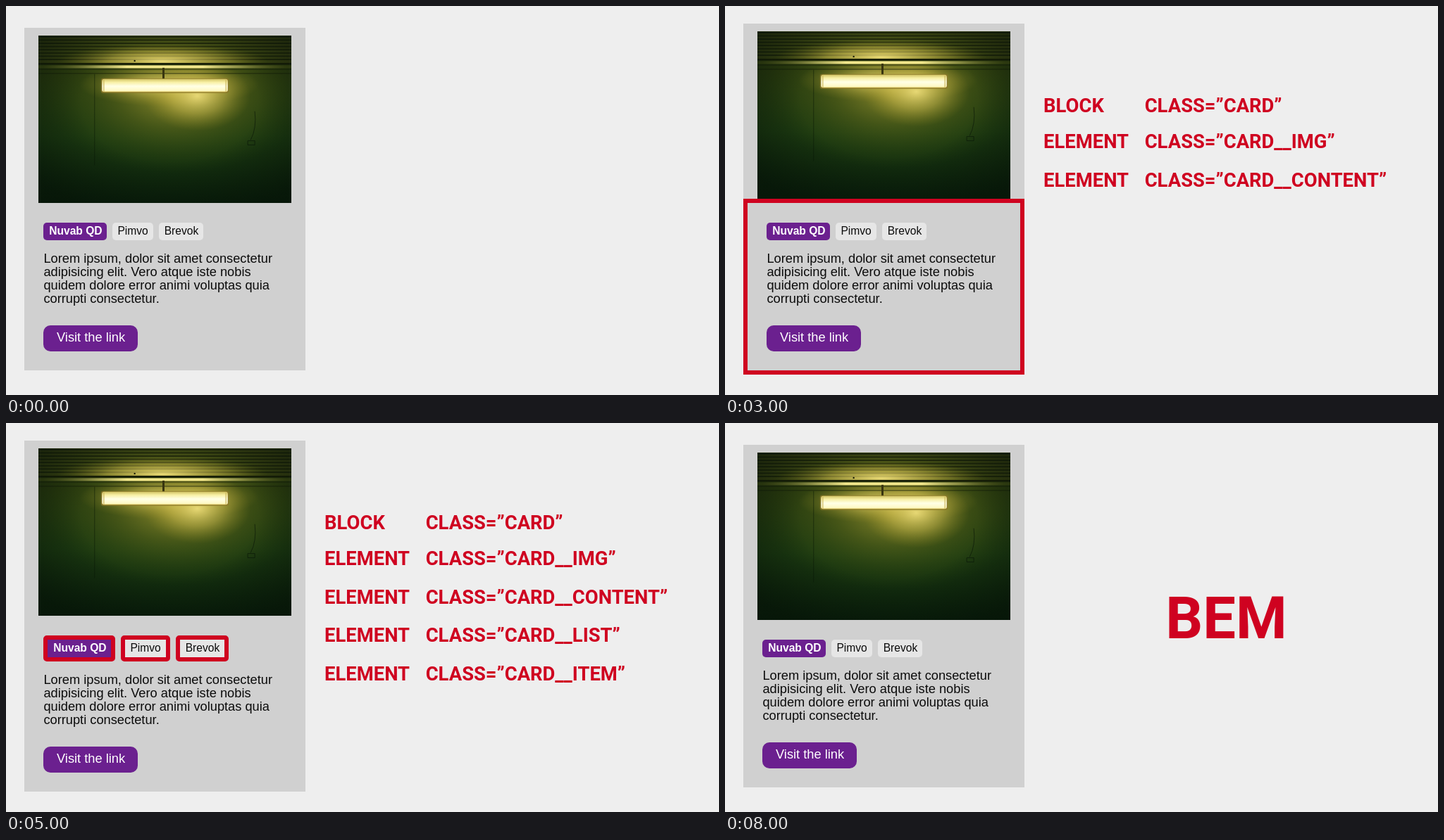
An HTML page for the animation above (9 s loop, 1012 px wide and 553 px high).

```html
<!DOCTYPE html>
<html lang="en">
<head>
<meta charset="utf-8">
<title>BEM card</title>
<style>
  :root { --red: #cf0220; --purple: #6b208f; --row: 54.7px; --loop: 9s; }

  html, body { margin: 0; width: 100%; height: 100%; overflow: hidden; background: #eee; }
  body { position: relative; }

  /* Card */
  .stage {
    position: absolute; left: 26px; top: 0; width: 399px; height: 548.7px;
    display: flex; align-items: center; justify-content: center;
  }
  .card {
    flex: none; width: 399px; padding-top: 11.4px; background: #d0d0d0; color: #0c0c0c;
    font: 18.26px/18.84px "Liberation Sans", Arial, sans-serif;
  }
  .card__img { box-sizing: border-box; width: 359px; margin: 0 auto; }
  .card__img svg { display: block; width: 100%; height: auto; }
  .card__content { padding: 27.4px; }
  .card__list { display: flex; gap: 8px; margin: 0; padding: 0; list-style: none; }
  .card__item {
    flex: none; padding: 3.2px 0 4.6px 7.8px; border-radius: 5px; background: #e6e6e6;
    font-size: 15.6px; line-height: 17px; white-space: nowrap;
  }
  .card__item:nth-child(1) { width: 81.4px; }
  .card__item:nth-child(2) { width: 50.5px; }
  .card__item:nth-child(3) { width: 55px; }
  .card__item--active { background: var(--purple); color: #fff; font-weight: 700; }
  .card__text { margin: 17.4px 0 28.5px; white-space: nowrap; }
  .card__link {
    width: 114.8px; padding: 7.6px 0 10.2px 18.6px; border-radius: 10px;
    background: var(--purple); color: #fff; white-space: nowrap;
  }

  /* The highlighted part takes a border and pushes its neighbours */
  .ring { border: 0 solid var(--red); animation: ring var(--loop) var(--at) step-end infinite; }
  .ring--long { animation-name: ring-long; }
  @keyframes ring { 0% { border-width: 6px } 11.111%, 100% { border-width: 0 } }
  @keyframes ring-long { 0% { border-width: 6px } 22.222%, 100% { border-width: 0 } }

  /* Legend */
  .legend, .bem { position: absolute; color: var(--red); font-family: Roboto, sans-serif; font-weight: 700; white-space: nowrap; }
  .legend {
    left: 452.1px; top: 111.4px; width: 560px; height: 0; overflow: hidden;
    font-size: 27.4px; line-height: var(--row);
    animation: reveal var(--loop) step-end infinite;
  }
  .legend div { position: relative; height: var(--row); }
  .legend div:first-child { top: 3.4px; }
  .legend span { position: absolute; left: 143.6px; animation: classes var(--loop) step-end infinite; }
  .bem {
    left: 625.3px; top: 236.2px; font-size: 83px; line-height: 83px;
    animation: bem var(--loop) step-end infinite;
  }
  @keyframes reveal {
    0% { height: 0 }
    11.111% { height: var(--row) }
    22.222% { height: calc(var(--row) * 2) }
    33.333% { height: calc(var(--row) * 3) }
    44.444% { height: calc(var(--row) * 4) }
    55.555% { height: calc(var(--row) * 5) }
    66.666% { height: calc(var(--row) * 6) }
    88.888%, 100% { height: 0 }
  }
  @keyframes classes { 0% { opacity: 1 } 77.777%, 100% { opacity: 0 } }
  @keyframes bem { 0% { opacity: 0 } 88.888%, 100% { opacity: 1 } }
</style>
</head>
<body>
<div class="stage">
  <div class="card ring" style="--at:1s">
    <div class="card__img ring" style="--at:2s">
      <svg viewBox="0 0 360 239">
        <defs>
          <linearGradient id="wall" x2="0" y2="1">
            <stop offset=".2" stop-color="#2b3a0e"/>
            <stop offset=".6" stop-color="#1c3a11"/>
            <stop offset="1" stop-color="#0b220c"/>
          </linearGradient>
          <radialGradient id="glow">
            <stop offset="0" stop-color="#a59c34" stop-opacity=".9"/>
            <stop offset=".45" stop-color="#5c671c" stop-opacity=".6"/>
            <stop offset="1" stop-color="#2c4710" stop-opacity="0"/>
          </radialGradient>
          <radialGradient id="warm">
            <stop offset="0" stop-color="#f0e07c" stop-opacity=".9"/>
            <stop offset=".5" stop-color="#c8b84c" stop-opacity=".5"/>
            <stop offset="1" stop-color="#8d8420" stop-opacity="0"/>
          </radialGradient>
          <radialGradient id="edge" cx=".52" cy=".4" r=".7">
            <stop offset=".5" stop-color="#051207" stop-opacity="0"/>
            <stop offset="1" stop-color="#051207" stop-opacity=".7"/>
          </radialGradient>
          <linearGradient id="strip">
            <stop offset=".02" stop-color="#6a7020" stop-opacity=".3"/>
            <stop offset=".35" stop-color="#f2e78c"/>
            <stop offset=".65" stop-color="#f2e78c"/>
            <stop offset=".98" stop-color="#6a7020" stop-opacity=".3"/>
          </linearGradient>
          <linearGradient id="tube" x2="0" y2="1">
            <stop offset="0" stop-color="#d3c566"/>
            <stop offset=".25" stop-color="#f8f0a6"/>
            <stop offset=".55" stop-color="#ffffe6"/>
            <stop offset=".9" stop-color="#fff9c4"/>
            <stop offset="1" stop-color="#d9c25c"/>
          </linearGradient>
          <pattern id="slats" width="360" height="4.6" patternUnits="userSpaceOnUse">
            <rect y="1" width="360" height="1.8" fill="#0b1104" opacity=".65"/>
          </pattern>
          <clipPath id="ceiling"><rect width="360" height="40"/></clipPath>
          <clipPath id="below"><rect y="46" width="360" height="193"/></clipPath>
        </defs>
        <rect width="360" height="239" fill="url(#wall)"/>
        <g clip-path="url(#below)">
          <ellipse cx="196" cy="84" rx="190" ry="112" fill="url(#glow)"/>
          <ellipse cx="186" cy="70" rx="128" ry="32" fill="url(#warm)"/>
          <ellipse cx="226" cy="86" rx="76" ry="50" fill="url(#warm)"/>
        </g>
        <g clip-path="url(#ceiling)">
          <rect width="360" height="40" fill="#3a4012"/>
          <ellipse cx="176" cy="36" rx="190" ry="46" fill="url(#glow)"/>
          <rect width="360" height="36" fill="url(#slats)"/>
          <ellipse cx="176" cy="37" rx="150" ry="24" fill="url(#warm)"/>
        </g>
        <rect y="39" width="360" height="2.5" fill="#181e07"/>
        <rect y="42.5" width="360" height="4" fill="url(#strip)"/>
        <path d="M0 48H360M0 54H360" stroke="#161f08" stroke-width="1.2" opacity=".65"/>
        <path d="M80 55V185" stroke="#0a1906" opacity=".55"/>
        <path d="M308 108Q311 132 302 149M298 150h10v6h-10z" fill="none" stroke="#071407" opacity=".6"/>
        <rect width="360" height="239" fill="url(#edge)"/>
        <path d="M178 46V62" stroke="#38350f" stroke-width="3"/>
        <circle cx="137" cy="36" r="1.2" fill="#151805"/>
        <rect x="89" y="61" width="182" height="21" rx="3" fill="#8a7628" opacity=".8"/>
        <rect x="90.5" y="62" width="179" height="18.5" rx="3" fill="url(#tube)"/>
        <path d="M93 63V80M267 63V80" stroke="#c9b258" stroke-width="2" opacity=".6"/>
      </svg>
    </div>
    <div class="card__content ring" style="--at:3s">
      <ul class="card__list ring" style="--at:4s">
        <li class="card__item card__item--active ring ring--long" style="--at:5s">Nuvab QD</li>
        <li class="card__item ring" style="--at:5s">Pimvo</li>
        <li class="card__item ring" style="--at:5s">Brevok</li>
      </ul>
      <p class="card__text">Lorem ipsum, dolor sit amet consectetur<br>adipisicing elit. Vero atque iste nobis<br>quidem dolore error animi voluptas quia<br>corrupti consectetur.</p>
      <div class="card__link">Visit the link</div>
    </div>
  </div>
</div>

<div class="legend">
  <div>BLOCK<span>CLASS=”CARD”</span></div>
  <div>ELEMENT<span>CLASS=”CARD__IMG”</span></div>
  <div>ELEMENT<span>CLASS=”CARD__CONTENT”</span></div>
  <div>ELEMENT<span>CLASS=”CARD__LIST”</span></div>
  <div>ELEMENT<span>CLASS=”CARD__ITEM”</span></div>
  <div>MODIFIER<span>CLASS=”CARD__ITEM--ACTIVE”</span></div>
</div>
<div class="bem">BEM</div>
</body>
</html>
```
